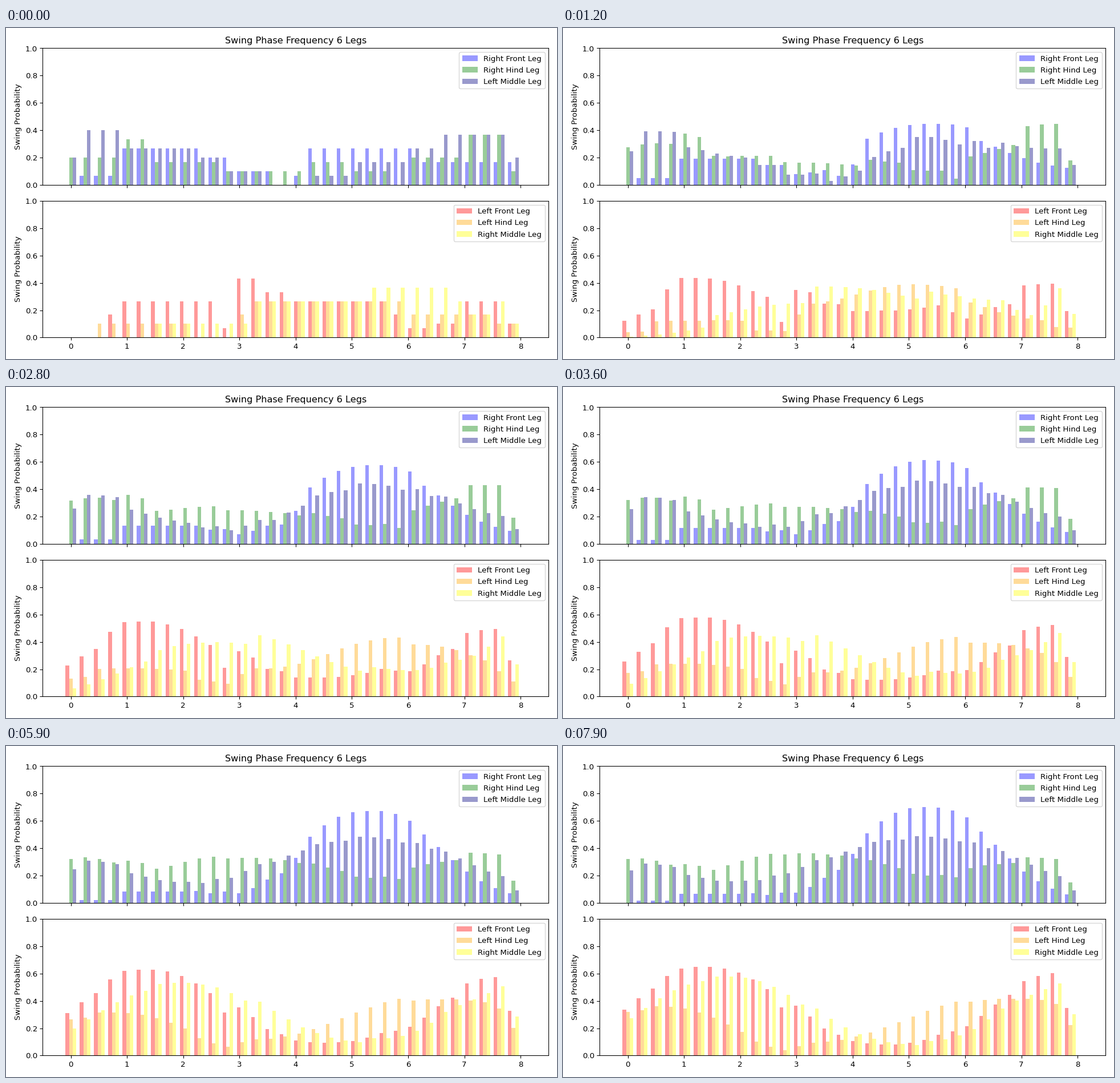
A matplotlib script that plays this animation: 966x580 px, repeating every 8 s.

```python
import numpy as np
import matplotlib.pyplot as plt
from matplotlib.animation import FuncAnimation

W, H, DPI = 966, 580, 96.6
FRAMES, STEP_MS = 80, 100
HOLD = 2              # extra frames spent on the opening chart
OPENING = 26          # weight of the opening trials in the running average
BINS = 32
BIN = 16 / 63         # distance between groups of bars
BAR = BIN / 4

plt.rcParams["font.family"] = "DejaVu Sans"


def share(k):
    """Part of the average that comes from trials after the opening."""
    return k / (k + OPENING)


EARLY, LATE = share(19), share(FRAMES - 1 - HOLD)


def steps(points):
    """Stair profile from (first bin, swings out of 30) pairs."""
    heights = np.zeros(BINS)
    for first, swings in points:
        heights[first:] = swings / 30
    return heights


def bumps(hills):
    """Sum of flat-topped hills given as (centre, height, width)."""
    n = np.arange(BINS)
    heights = sum(h * np.exp(-np.abs((n - c) / w) ** 2.5) for c, h, w in hills)
    heights[-1] *= 0.6    # the last bin is cut short by the end of the cycle
    return heights


class Leg:
    """Opening profile that is averaged with newer trials as they drift."""

    def __init__(self, ax, slot, name, color, opening, early, late):
        self.opening = steps(opening)
        self.early, self.late = np.array(early), np.array(late)
        x = np.arange(BINS) * BIN + slot * BAR
        self.bars = ax.bar(x, self.opening, BAR, color=color, alpha=0.4, label=name)

    def show(self, k):
        new = share(k)
        drift = (new - EARLY) / (LATE - EARLY)
        recent = bumps(self.early + (self.late - self.early) * drift)
        for bar, h in zip(self.bars, (1 - new) * self.opening + new * recent):
            bar.set_height(h)


fig, (top, low) = plt.subplots(
    2, 1, sharex=True, figsize=(W / DPI, (H + 0.001) / DPI), dpi=DPI)
fig.subplots_adjust(left=64.4 / W, right=951.4 / W, top=1 - 35.5 / H,
                    bottom=1 - 542.4 / H, hspace=28 / 239.4)

legs = [
    Leg(top, -1, "Right Front Leg", "blue",
        [(1, 2), (4, 8), (10, 6), (12, 3), (15, 0), (16, 2), (17, 8), (25, 5)],
        early=[(21.5, 0.90, 6.0)],
        late=[(21.2, 0.85, 6.3)]),
    Leg(top, 0, "Right Hind Leg", "green",
        [(0, 6), (4, 10), (6, 5), (11, 3), (17, 5), (20, 3), (23, 0), (24, 6),
         (28, 11), (31, 3)],
        early=[(1, 0.40, 3.5), (11, 0.37, 9), (29.5, 0.55, 6)],
        late=[(0, 0.34, 4), (12.5, 0.45, 8), (28, 0.32, 6.5)]),
    Leg(top, 1, "Left Middle Leg", "navy",
        [(0, 6), (1, 12), (4, 8), (9, 6), (11, 3), (14, 0), (17, 2), (20, 5),
         (24, 8), (26, 11), (31, 6)],
        early=[(1, 0.34, 5), (20, 0.76, 6)],
        late=[(0, 0.25, 6), (19.5, 0.60, 9)]),
    Leg(low, -1, "Left Front Leg", "red",
        [(3, 5), (4, 8), (11, 2), (12, 13), (14, 10), (16, 8), (23, 5), (24, 2),
         (26, 3), (28, 8), (31, 3)],
        early=[(5, 0.85, 6), (30.5, 0.72, 7)],
        late=[(5.5, 0.78, 7), (31, 0.72, 7)]),
    Leg(low, 0, "Left Hind Leg", "orange",
        [(2, 3), (9, 0), (12, 5), (13, 8), (24, 5), (30, 3)],
        early=[(5, 0.27, 9), (22.5, 0.63, 6.5)],
        late=[(2, 0.45, 6.5), (27, 0.50, 9)]),
    Leg(low, 1, "Right Middle Leg", "yellow",
        [(6, 3), (13, 8), (21, 11), (27, 8), (28, 5), (30, 8), (31, 3)],
        early=[(11, 0.68, 8), (30.5, 0.62, 3.2)],
        late=[(6.5, 0.74, 7.5), (30.5, 0.62, 5.5)]),
]

top.set_title("Swing Phase Frequency 6 Legs")
for ax in (top, low):
    ax.set_xlim(-0.5, 8.5)
    ax.set_xticks(range(9))
    ax.set_ylim(0, 1)
    ax.set_ylabel("Swing Probability")
    ax.legend(loc="upper right", labelspacing=0.54)


def update(i):
    for leg in legs:
        leg.show(max(0, i - HOLD))
    return []


anim = FuncAnimation(fig, update, frames=FRAMES, interval=STEP_MS,
                     init_func=lambda: update(0), repeat=True, repeat_delay=0)
plt.show()
```
